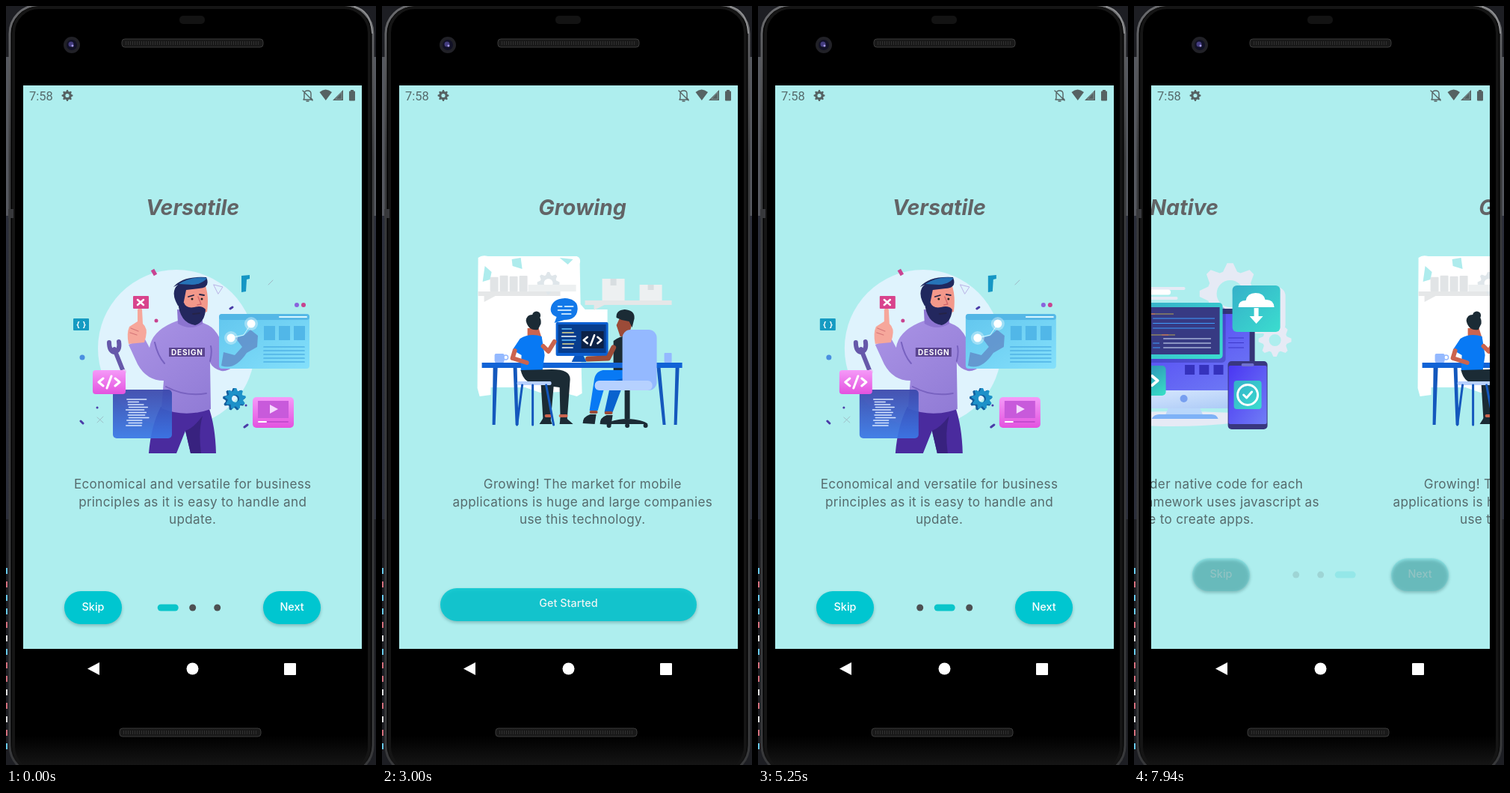
An HTML page that plays this animation: 495 px wide and 1013 px high, repeating every 8000 ms.

```html
<!DOCTYPE html>
<html lang="en">
<head>
<meta charset="utf-8">
<title>Onboarding</title>
<style>
html, body { margin: 0; width: 100%; height: 100%; overflow: hidden; background: #1d1e23; }
svg { display: block; width: 495px; height: 1013px; }
text { font-family: Inter, "Open Sans", sans-serif; text-anchor: middle; }
.title { font-size: 28.6px; font-weight: 700; font-style: italic; fill: #626466; }
.body { font-size: 17.1px; letter-spacing: .33px; fill: #566b6d; }
.label { font-size: 14.4px; font-weight: 500; fill: #fff; }
.clock { font: 16.5px Roboto, sans-serif; fill: #566b6c; }
.small { font-size: 10px; font-weight: 700; letter-spacing: .8px; fill: #fff; }
</style>
</head>
<body>
<svg id="stage" viewBox="0 0 495 1013"></svg>
<script>
const PAGE = 453, LOOP = 8000, SETTLE = 300;

let seed = 7;
const rand = (a, b) => a + (b - a) * ((seed = seed * 16807 % 2147483647) / 2147483647);
const times = (n, f) => Array.from({ length: n }, (_, i) => f(i)).join('');

// Shape helpers
const R = (x, y, w, h, fill, rx = 0, more = '') =>
  `<rect x="${x}" y="${y}" width="${w}" height="${h}" rx="${rx}" fill="${fill}" ${more}/>`;
const C = (x, y, r, fill, more = '') => `<circle cx="${x}" cy="${y}" r="${r}" fill="${fill}" ${more}/>`;
const P = (d, fill, more = '') => `<path d="${d}" fill="${fill}" ${more}/>`;
const L = (d, color, w = 1, more = '') =>
  P(d, 'none', `stroke="${color}" stroke-width="${w}" stroke-linecap="round" stroke-linejoin="round" ${more}`);
const T = (x, y, s, cls) => `<text x="${x}" y="${y}" class="${cls}">${s}</text>`;
const G = (dx, s) => `<g transform="translate(${dx})">${s}</g>`;
const grad = (id, a, b, dir = 'x2="1" y2="1"') =>
  `<linearGradient id="${id}" ${dir}><stop stop-color="${a}"/><stop offset="1" stop-color="${b}"/></linearGradient>`;

function gear(x, y, r, hole, fill, teeth = 8) {
  const pts = times(teeth * 4, i => {
    const tip = i % 4 == 1 || i % 4 == 2, a = (i - 1.5 + (tip ? 0 : (i % 4 ? .1 : -.1))) * Math.PI / 2 / teeth - Math.PI / 2;
    const k = tip ? r : r * .75;
    return `${i ? 'L' : 'M'}${x + k * Math.cos(a)} ${y + k * Math.sin(a)}`;
  });
  return P(`${pts}zM${x - hole} ${y}a${hole} ${hole} 0 1 0 ${2 * hole} 0a${hole} ${hole} 0 1 0 ${-2 * hole} 0z`, fill, 'fill-rule="evenodd"');
}

// Rows of code with random indents and lengths
const code = (x, y, rows, step, max, colors, w = 1.5) => times(rows, i => {
  const indent = rand(0, max * .15);
  return L(`M${x + indent} ${y + i * step}h${rand(.5, .98) * max - indent}`, colors[i % colors.length], w);
});
const tag = (x, y, s) =>
  L(`M${x - 8 * s} ${y - 5 * s}l${-6 * s} ${5 * s}l${6 * s} ${5 * s}M${x + 8 * s} ${y - 5 * s}l${6 * s} ${5 * s}l${-6 * s} ${5 * s}M${x + 3 * s} ${y - 8 * s}l${-6 * s} ${16 * s}`, '#fff', 3 * s);
const copy = (title, ...lines) =>
  T(249.5, 279, title, 'title') + lines.map((s, i) => T(249.7, 644 + i * 23.7, s, 'body')).join('');

function versatile() {
  return copy('Versatile', 'Economical and versatile for business', 'principles as it is easy to handle and', 'update.') +
    C(228, 457, 105, '#dff3fd') +
    // scattered bits
    L('M196 352l4 7', '#c94392', 5, 'style="stroke-linecap:butt"') + L('M278 372l12 3-6 9z', '#b9b3e6') +
    P('M315 360l11-1v5l-4 1-1 16-6 1z', '#1596c4') + L('M351 372l6-6', '#9fb7c4') +
    C(389, 399, 3, '#8a62dd') + C(398, 399, 3, '#c8438f') + C(201, 420, 2.5, '#c8438f') + C(102, 469, 3.5, '#4a8fe0') +
    L('M122 549l8 7m0-8l-8 8', '#9fc0c8') + L('M100 554l3 3M300 404l3-2M319 562l4-3M122 536h.1M321 533h.1', '#4b3ca8', 3) +
    R(90, 417, 21, 16, '#169bc2', 1) + T(101, 428.5, '{ }', 'small') +
    // legs and sweater
    P('M207 535H271Q280 560 281 597H247L240 567 228 597H191Q194 560 207 535z', '#4a2b9e') +
    P('M240 567l7 30h14q-4-30 2-50-12 16-23 20z', '#38227f') +
    P('M222 423Q246 412 266 424Q285 430 293 464L311 447 322 460Q304 489 288 487 277 484 273 476L274 538Q240 550 208 537L211 500Q188 500 176 478L164 452 185 443 192 456Q195 435 222 423z', 'url(#sweater)') +
    L('M199 449q4 18 13 28M273 474q3-12 1-20M214 508q25 14 54 9', '#7862c0', 2) +
    // raised hand
    P('M164 451Q161 437 165 428L176 421V405Q180 401 182 405L183 424Q190 430 187 442L185 449z', '#f6a79b') +
    L('M167 430l10 4M166 436l9 3', '#d67779', 1.3) +
    R(170, 387, 21, 17, '#d8438c', 1) + L('M176 392l8 7m0-7l-8 7', '#fff', 2.5) +
    // head
    P('M229 405L230 424Q247 434 263 424V408z', '#8c74d0') +
    P('M234 375L266 371Q272 386 269 408L248 415Q231 408 234 375z', '#f3988a') +
    P('M230 394L238 396Q241 404 252 402 262 399 267 405 266 422 253 426 232 423 230 394z', '#23275e') +
    P('M227 394Q221 380 230 372L224 375Q236 360 268 362 274 376 258 377L241 379 237 399 230 400z', '#20285e') +
    P('M231 371q18-11 38-8-6 8-20 9z', '#2673b8') +
    L('M244 388l7-2M259 385l6 1M250 411l9-1', '#252347', 1.8) + L('M257 388l4 10-5 1', '#d4686b', 1.5) +
    C(249, 391, 1.5, '#222') + C(262, 391, 1.5, '#222') +
    R(218, 456, 48, 12, '#5a4490') + T(242.4, 465.7, 'DESIGN', 'small') +
    // wrench
    L('M145 458l12 30M138 449q0 12 7 13 8-2 6-14', '#6658aa', 6) + C(158, 488, 3, '#e6c8f4') +
    // code panels
    R(143, 512, 79, 65, 'url(#panel)', 5, 'opacity=".93"') + code(160, 525, 11, 3.5, 33, ['#d9e7ff']) +
    R(116, 486, 44, 32, 'url(#pink)', 4) + tag(138, 502, 1) +
    // glass panel with reaching hand
    R(285, 411, 121, 73, 'url(#glass)', 4) + R(285, 411, 121, 8, '#4aaee2', 4, 'opacity=".7"') +
    L('M366 415h36', '#d9f7ff', 2) +
    times(3, i => R(345 + i * 20, 427, 15, 19, '#51b7e8')) +
    times(5, i => L(`M345 ${455 + i * 5}h54`, '#4fb3e6', 1.7)) +
    P('M288 480L291 462 306 466 316 455 307 443 318 440 327 432 337 440 336 455 322 463Q306 487 288 480z', '#5f86c4', 'opacity=".75"') +
    L('M328 424l-10 15-17 4', '#d7f5ff') +
    [[328, 424], [301, 443]].map(([x, y]) => C(x, y, 9, '#fff', 'opacity=".35"') + C(x, y, 5.5, '#fff')).join('') +
    gear(305, 525, 15, 5, '#135e9d', 9) + gear(307, 524, 14, 5, '#1d91c9', 9) +
    R(330, 522, 55, 41, 'url(#pink)', 5) + R(337, 527, 41, 23, '#c85adb') + P('M353 532v12l11-6z', '#f5d9ff') +
    L('M338 555h39', '#c44bcf', 2) + L('M338 555h10', '#fff', 2);
}

function native() {
  const haze = '#e6eaf5', pale = '#dcecff', blue = '#3f9dfd', gold = '#b6a64e';
  return copy('Native', 'Unable to render native code for each', 'platform, this framework uses javascript as', 'a base to create apps.') +
    gear(311, 384, 41, 18, haze) + gear(371, 446, 22, 8, haze) + gear(154, 517, 34, 14, haze) +
    R(314, 375, 71, 62, haze, 12) +
    P('M150 545Q220 538 315 543L321 556Q245 565 166 558Q143 553 150 545z', haze) +
    L('M174 377h75M182 390h57', haze, 4) + times(9, i => L(`M${rand(116, 120)} ${377 + i * 11}h20`, haze, 4)) +
    L('M188 382h40', '#fff', 7) +
    // monitor
    R(156, 404, 188, 112, '#343575', 4) + R(156, 411, 181, 102, 'url(#screen)') +
    P('M156 513H335V533Q335 537 331 537H160Q156 537 156 533z', 'url(#chin)') + C(249, 524, 5, '#779ff0') +
    P('M228 537h43l4 10h-51z', '#b9d7fb') + P('M206 551q3-6 10-6h70q7 0 9 6z', '#7eb2f7') +
    times(3, i => R(250.5 + i * 19.2, 479, 13, 13, '#3532bd') + L(`M309 ${443 + i * 6.5}h20`, '#3d39ca')) +
    // code windows
    R(190, 402, 115, 74, '#25288c', 5, 'opacity=".35"') + R(186, 396, 115, 75, 'url(#teal)', 5) + R(192, 402, 105, 63, '#373a83') +
    L('M204 411h31M204 439h33', gold) + times(3, i => L(`M208 ${417 + i * 6.5}h82`, blue) + L(`M222 ${444 + i * 6}h63`, pale)) +
    L('M204 411h6M220 439h8', '#d4675b') + L('M208 450h8M208 456h9', blue) +
    R(127, 370, 46, 45, 'url(#teal)', 5) + R(133, 375, 35, 34, '#373a83') + code(138, 382, 5, 5, 26, [pale, blue]) +
    R(127, 425, 46, 45, 'url(#teal)', 5) + gear(150, 448, 15, 6, '#fff') +
    R(168, 480, 57, 40, 'url(#deep)', 5) + tag(196.5, 500, 1.25) +
    R(314, 373, 64, 62, 'url(#teal)', 6) +
    P('M322 402q0-9 10-9 2-10 13-10 11 0 13 9 11-1 12 10z', '#fff') + P('M343 403h6v11h6l-9 10-9-10h6z', '#fff') +
    // phone
    R(308, 474, 53, 91, '#39377f', 5) + R(309, 480, 51, 78, 'url(#screen)', 2) + R(326, 477, 17, 4, '#7072cf', 2) +
    R(316, 500, 37, 38, 'url(#teal)', 4) + C(334.5, 519, 13.5, 'none', 'stroke="#fff" stroke-width="3"') + L('M329 519l4 4 7-8', '#fff', 3);
}

function growing() {
  const shade = '#e5e7e8', dark = '#1b2b35', blue = '#0879f4', skin = '#cb644e', brown = '#9c4b38', sky = '#94b9ff';
  const steel = '#1458bd';
  return copy('Growing', 'Growing! The market for mobile', 'applications is huge and large companies', 'use this technology.') + G(-107,
    P('M217 336Q222 332 230 334H349Q355 336 353 344L354 398 360 405H390V440H354L356 517 349 521 328 515 300 516 280 509H234V519L219 521 216 510z', '#fff') +
    P('M262 338l12-2 2 15-13-4zM226 347l9 8-2 10-10 3zM326 336l18 2-7 7z', '#aeeced') +
    R(217, 381, 110, 6, shade) + R(360, 393, 116, 6, shade) + P('M225 387h15l-15 8zM372 399h14l-14 7z', shade) +
    times(4, i => { const h = rand(18, 26); return R(233 + i * 13, 381 - h, 11, h, '#e1e4e6', 1); }) +
    gear(311, 370, 15, 6, '#dfe6ea') + R(284, 372, 64, 9, '#edf0f1') +
    R(383, 364, 30, 29, '#edf0f1') + R(433, 372, 30, 21, '#edf0f1') + R(394, 364, 8, 9, '#d8dee1') + R(444, 372, 8, 7, '#d8dee1') +
    // speech bubble and monitor
    P('M314 405Q315 391 333 390 351 391 350 405 349 419 332 419L319 423 322 415Q314 412 314 405z', '#1278e9') +
    L('M324 401h5m4 0h11M324 406h17M329 411h12', '#bee1ff', 1.8) +
    R(321, 422, 70, 45, '#0c60d2', 2) + R(324, 425, 64, 38, '#073d8d') + R(355, 434, 30, 23, '#0c2146') + tag(370, 446, .85) +
    code(328, 431, 6, 5, 21, ['#67c4ff', '#e8d98b', '#fff'], 1.3) +
    P('M346 467h12l4 8h-20z', '#0a55bd') + R(239, 464, 13, 12, sky, 2) + C(254, 469, 3, 'none', `stroke="${sky}" stroke-width="1.5"`) + R(466, 463, 10, 13, sky, 1) +
    // right person
    P('M402 426L407 441H418L424 421Q420 409 408 413z', brown) + P('M402 416Q401 406 413 405 427 406 426 417L423 429 419 421 409 419z', dark) +
    P('M398 447Q410 438 420 441L425 490H398z', dark) + L('M398 456l-7 14-27 1', brown, 7) +
    // desk
    P('M237 483h6l-3 76h-4zM264 483h5l2 76h-4zM456 483h5l7 76h-4zM481 483h5l-3 76h-4z', steel) + R(222, 476, 268, 7, '#1163d6') +
    // left person and stool
    P('M283 430h15l4 13-19 2z', skin) + C(295, 413, 5.5, dark) + P('M281 420Q282 411 291 412 302 412 301 424L297 432Q284 434 281 420z', dark) +
    P('M273 444Q286 436 302 441L306 466 303 487H274L275 466 263 459z', blue) +
    L('M266 460l-3 10 19 6M304 454l7 7 8-13', skin, 6) +
    P('M274 486L316 485Q341 485 340 499L336 553H327L326 509 318 508 314 554H304L301 505Q278 506 274 486z', dark) +
    P('M327 550h8l9 8H326zM304 550h9l3 8H299z', dark) + L('M308 547h6M327 547h8', skin, 4) +
    R(269, 501, 46, 5, '#b8d1ff', 2) + L('M276 506l-7 53M290 506v53M308 506l10 53', steel, 3) +
    // chair and jeans
    P('M416 486H384Q373 488 372 501L366 540H377L386 509H415z', blue) + P('M414 496L395 501 386 542H397L408 513 429 507z', '#0962ce') +
    P('M357 557q0-9 10-12h8l-2 13zM380 558q0-9 9-12h8l-2 13z', dark) + L('M368 542h7M388 543h7', brown, 4) +
    R(410, 432, 46, 81, sky, 11) + R(373, 500, 77, 13, '#b6d1ff', 6) + R(413, 513, 7, 38, dark) +
    P('M389 558q6-6 27-7 22 1 28 7z', dark) + times(3, i => C(392 + i * 24.5, 560, 3, dark)));
}

const button = (x, w, s) =>
  `<g class="shade">${R(x, 783, w, 44, '#0a3c3e', 22, 'opacity=".3" filter="url(#soft)"')}</g>
  <g class="face">${R(x, 781, w, 44, '#00c6d0', 22)}${T(x + w / 2, 806.5, s, 'label')}</g>`;

const grille = (x, y) => R(x, y, 189, 11, '#191919', 4, 'stroke="#3a3a3a"') +
  L(`M${x + 5} ${y + 5.5}h179`, '#303030', 5, 'stroke-dasharray="1 2" style="stroke-linecap:butt"');

const device = () => R(0, 0, 495, 1013, '#1d1e23') + R(0, 68, 495, 212, '#55585f') + R(0, 280, 495, 405, '#2b2e3a') +
  times(14, i => R(0, 750 + i * 18, 2, 8, ['#67c6e8', '#ddd', '#d16f7c'][Math.floor(rand(0, 3))])) +
  R(5, -1, 486, 1026, 'url(#base)', 38, 'stroke="url(#rim)" stroke-width="3"') +
  R(10, 2, 476, 1020, 'none', 34, 'stroke="#151515" stroke-width="4"') +
  L('M466 1Q488 6 490 36', '#8d8e90', 2) + R(3, 271, 7, 12, '#38393c') + R(232, 13, 34, 11, '#131313', 5) +
  grille(155, 44) + grille(152, 964) +
  C(88, 52, 11, '#212127') + C(88, 52, 7, '#111126') + C(87, 51, 3.5, '#443d80') + C(89, 53, 1.5, '#a89bea') +
  P('M109 884.5l16-8.5v17z', '#fff') + C(249.5, 884.5, 8, '#fff') + R(372, 877, 16, 16, '#fff', 1);

const ink = '#566263';
const status = T(47, 125.5, '7:58', 'clock') + gear(82, 119.5, 7.5, 2.6, ink) +
  L('M399 123V117Q399 113 403.5 113 408 113 408 117V123L410 125H398zM397 113l13 13M402 127h3', ink, 1.4) +
  P('M419.5 115q8-7 16.5 0l-8.2 11zM451 112v14h-14z', ink) + L('M441 124l8-9v9z', '#7d9294') +
  R(459, 113.5, 8, 13, ink, 1) + R(461, 112, 4, 2, ink);

stage.innerHTML = `<defs>
  ${grad('base', '#000', '#1b1b1b', 'x1="0" y1=".95" x2="0" y2="1"')}${grad('rim', '#6a6b6e', '#38393b', 'x2="0" y2=".2"')}
  ${grad('sweater', '#ab94e6', '#8b76d2')}${grad('panel', '#3a47ab', '#3b78e6', 'x2="0" y2="1"')}
  ${grad('pink', '#f59af8', '#e352df', 'x2="0" y2="1"')}${grad('glass', '#62c6ee', '#84e0fb')}
  ${grad('screen', '#4a36f3', '#707df5')}${grad('chin', '#dcebff', '#a9c8f6')}
  ${grad('teal', '#35b0c9', '#3bddcf')}${grad('deep', '#2c70b2', '#38e2c7')}
  <filter id="soft" x="-20%" y="-40%" width="140%" height="180%"><feGaussianBlur stdDeviation="2.3"/></filter>
  <clipPath id="view">${R(23, 106, 453, 752, '#000')}</clipPath></defs>
  ${device()}<g clip-path="url(#view)">${R(23, 106, 453, 752, '#aeeeee')}
  <g id="pages">${[versatile, native, growing].map((f, i) => G(i * PAGE, f())).join('')}</g>
  <g id="steps">${button(78, 77, 'Skip')}${button(344, 77, 'Next')}
  <g id="dots">${times(3, () => R(0, 798.5, 9, 9, '', 4.5))}</g></g>
  <g id="start">${button(78, 343, 'Get Started')}</g>${status}</g>
  <g id="cursor">${C(0, 0, 12, '#dcc94e', 'id="touch" opacity=".65"')}
  ${P('M0 0V16.5L4 13L6.8 19L9.4 17.8L6.7 12H11.5z', '#fff', 'stroke="#222" stroke-width="1.1"')}</g>`;

// Each swipe: press time, release time, start x, end x, y
const swipes = [
  [1150, 1450, 425, 100, 481], [2558, 2860, 428, 100, 472], [3600, 4020, 208, 480, 463], [4780, 5050, 187, 440, 477],
  [5690, 5890, 300, 40, 508], [6650, 6878, 259, 30, 520], [7680, 7910, 250, 450, 515],
].map(([press, release, x0, x1, y]) => ({ press, release, x0, x1, y }));

const clamp = (v, a = 0, b = 1) => Math.min(b, Math.max(a, v));
const smooth = u => u * u * (3 - 2 * u);
const mix = (a, b, u) => a + (b - a) * u;

// A finger speeds up, then flies off the stage at its last speed
function finger(s, t) {
  const u = Math.max(0, (t - s.press) / (s.release - s.press));
  return clamp(mix(s.x0, s.x1, u < 1 ? u * u : 2 * u - 1), -30, 510);
}

function pose(t) {
  const done = swipes.filter(s => s.press <= t), last = done[done.length - 1], next = swipes[done.length];
  const turn = s => s.x1 < s.x0 ? 1 : -1;
  let page = done.slice(0, -1).reduce((n, s) => n + turn(s), 0), offset = page * PAGE;
  let x = 275, y = 1020, back = (t - 200) / 730;
  if (last) {
    const target = page + turn(last), u = clamp((t - last.release) / SETTLE);
    const dragged = offset + last.x0 - finger(last, Math.min(t, last.release));
    offset = mix(target * PAGE, dragged, (1 - u) ** 3);
    if (u === 1) page = target;
    x = finger(last, t);
    y = last.y;
    // The pointer comes back in the middle of the pause between swipes
    back = next ? ((t - last.release) / (next.press - last.release) - .33) / .37 : 0;
  }
  if (next) {
    const u = smooth(clamp(back));
    x = mix(x, next.x0, u);
    y = mix(y, next.y, u);
  }
  return { offset, page, x, y, touching: !!last && t < last.release };
}

function fade(group, alpha, dy) {
  group.setAttribute('transform', `translate(0 ${dy})`);
  group.style.display = alpha > 0 ? '' : 'none';
  for (const e of group.querySelectorAll('.face, #dots')) e.setAttribute('opacity', alpha);
  for (const e of group.querySelectorAll('.shade')) e.setAttribute('opacity', Math.min(1, alpha * 10));
}

const $ = id => document.getElementById(id);
const origin = performance.now();

function draw(now) {
  const { offset, page, x, y, touching } = pose(Math.max(0, now - origin) % LOOP);
  const f = Math.max(0, offset / PAGE - 1);
  $('pages').setAttribute('transform', `translate(${-offset})`);
  fade($('steps'), clamp(1 - 2.1 * f), -109 * f);
  fade($('start'), clamp((f - .74) / .26), -98 * (1 - f));
  [...$('dots').children].forEach((dot, i) => {
    const w = i === page ? 28 : 9;
    dot.setAttribute('x', 216.7 + 33 * i - w / 2);
    dot.setAttribute('width', w);
    dot.setAttribute('fill', i === page ? '#0ac5ca' : '#4d5052');
  });
  $('cursor').setAttribute('transform', `translate(${x} ${y})`);
  $('touch').style.display = touching ? '' : 'none';
  requestAnimationFrame(draw);
}
draw(origin);
</script>
</body>
</html>
```
